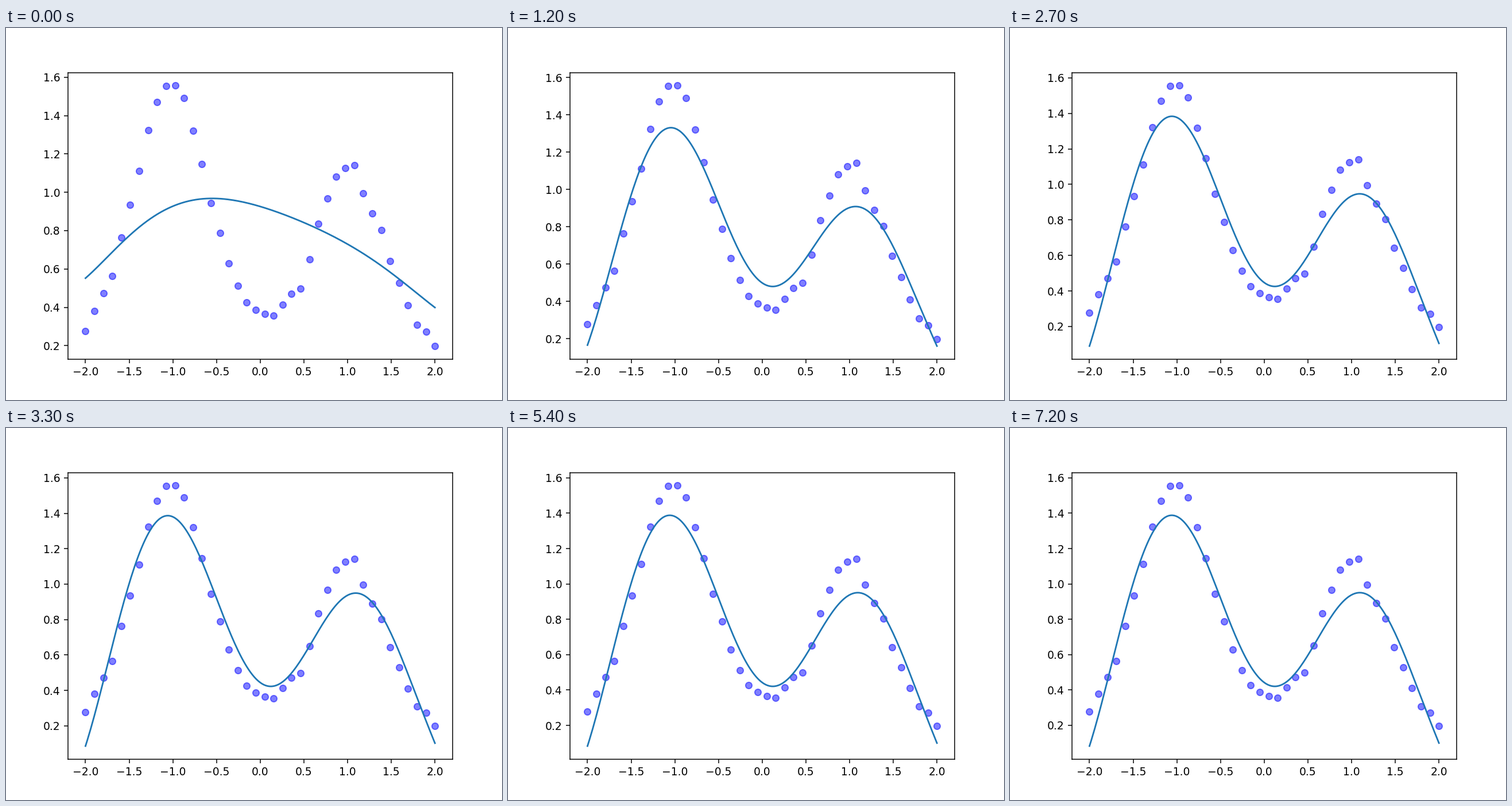
These frames come from a looping animation (864 px wide and 648 px high, 7500 ms). A matplotlib script:

```python
import numpy as np
import matplotlib.pyplot as plt
from matplotlib.animation import FuncAnimation

FRAMES, STEP_MS = 25, 300
COUNT = 40
LOW, HIGH = 0.198, 1.556   # range of the samples
DECAY = 0.61               # share of the error left after each step


def bump(x, center, height, width=0.5):
    return height * np.exp(-(x - center) ** 2 / width)


def make_samples(x):
    """Two bumps with a ripple and light noise, scaled to the sample range."""
    rng = np.random.default_rng(1)
    y = bump(x, -1.02, 1.48) + bump(x, 1.01, 1.05)
    y += 0.05 * np.cos(2 * np.pi * np.arange(x.size) / 9.6)
    y += rng.normal(0, 0.02, x.size)
    return LOW + (HIGH - LOW) * (y - y.min()) / np.ptp(y)


def smooth_curve(x, points, slopes, degree):
    """Least-squares polynomial through (x, y) points and (x, dy/dx) slopes."""
    px, py = np.transpose(points)
    sx, sy = np.transpose(slopes)
    n = np.arange(degree + 1)
    rows = np.vstack([px[:, None] ** n,
                      0.15 * n * sx[:, None] ** np.maximum(n - 1, 0)])
    goal = np.concatenate([py, 0.15 * sy])
    coef = np.linalg.lstsq(rows, goal, rcond=None)[0]
    return np.polynomial.polynomial.polyval(x, coef)


x_data = np.linspace(-2, 2, COUNT)
x_fit = np.linspace(-2, 2, 200)

start = smooth_curve(
    x_fit,
    [(-2, .552), (-1.5, .773), (-.55, .968), (.5, .842), (1.5, .579), (2, .399)],
    [(-.55, 0)], degree=6)

extrema = [(-1.062, 1.388), (.113, .421), (1.093, .951)]
final = smooth_curve(
    x_fit,
    [(-2, .083), (-1.487, 1.025), (-.564, 1.003), (.564, .648),
     (1.487, .733), (2, .1), *extrema],
    [(-2, 1.54), (2, -1.22), *((x, 0) for x, _ in extrema)], degree=10)

# the middle settles first, the ends lag behind
delay = 0.8 - bump(x_fit, -.45, 1.3, 1.7)


def curve_at(step):
    if step == 0:
        return start
    return final + (start - final) * DECAY ** (step - delay)


fig, ax = plt.subplots(figsize=(6.4, 4.8), dpi=135)
ax.plot(x_data, make_samples(x_data), "bo", alpha=.5)
line, = ax.plot(x_fit, start)


def update(step):
    line.set_ydata(curve_at(step))
    ax.relim()
    ax.autoscale_view()
    return line,


anim = FuncAnimation(fig, update, frames=FRAMES, interval=STEP_MS,
                     repeat=True, repeat_delay=0)
plt.show()
```
